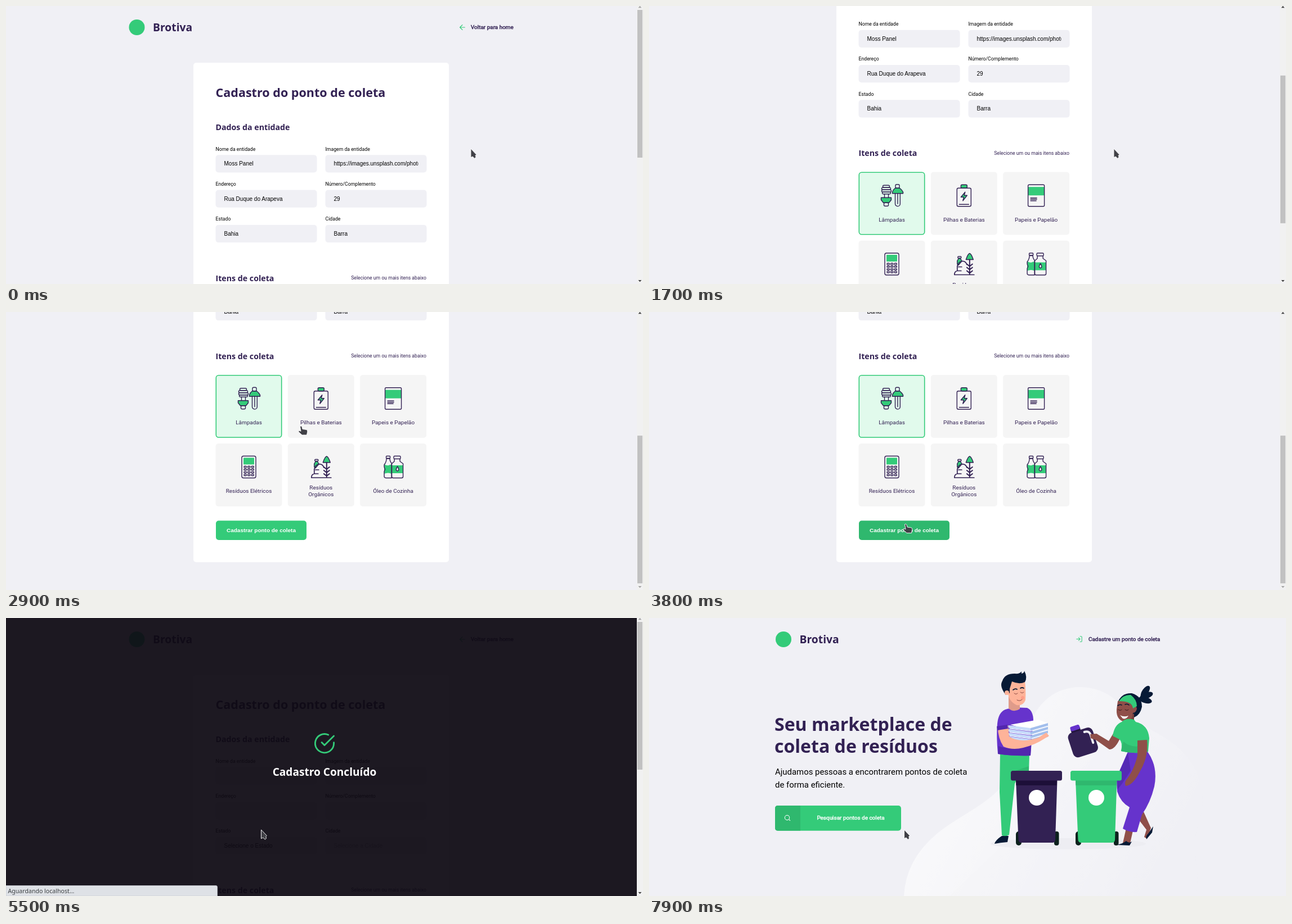
Animation of 1132 by 495 pixels, one loop 8 s. Source, as an HTML page:

```html
<!DOCTYPE html>
<html lang="pt-BR">
<head>
<meta charset="utf-8">
<title>Cadastro de ponto de coleta</title>
<style>
  html, body { margin: 0; width: 100%; height: 100%; overflow: hidden; background: #f0f0f5; }
  svg.stage { display: block; width: 100vw; height: 100vh; }
  text { font: 8.7px Roboto, sans-serif; fill: #000; white-space: pre; }
  .title { font: 700 21.55px "Open Sans", sans-serif; fill: #322153; }
  .sub { font-size: 14.2px; }
  .brand { font-size: 19.3px; }
  .hero { font-size: 32.05px; }
  .done { font-size: 19.1px; fill: #fff; }
  .note { fill: #322153; }
  .item { font-size: 9.95px; fill: #322153; }
  .link { font-size: 9.95px; fill: #322153; stroke: #322153; stroke-width: .45px; }
  .light { fill: #fff; stroke: #fff; }
  .lead { font-size: 14.93px; }
  .value, .hint { font: 10px "Liberation Sans", Arial, sans-serif; }
  .hint { fill: #999; }
  .submit { font: 700 9.97px "Liberation Sans", Arial, sans-serif; fill: #fff; }
  .status { font: 10.6px "Noto Sans", sans-serif; fill: #3c4043; }
  .icon { fill: none; stroke: #322153; stroke-width: 1.4; stroke-linejoin: round; stroke-linecap: round; }
  .icon .g { fill: #34cb79; }
  .icon .n { stroke: none; }
  .line { fill: none; stroke: #34cb79; stroke-width: 2; stroke-linecap: round; stroke-linejoin: round; }
</style>
</head>
<body>
<script>
const GREEN = '#34cb79', DARK_GREEN = '#2fb86e', PLUM = '#322153', VIOLET = '#6633cc';
const NAVY = '#071a36', PEACH = '#feb399', BROWN = '#8f4f49';

const text = (x, y, str, cls = '', anchor = 'start') =>
  `<text x="${x}" y="${y}" class="${cls}" text-anchor="${anchor}">${str}</text>`;
const rect = (x, y, w, h, r = 0, fill = '', extra = '') =>
  `<rect x="${x}" y="${y}" width="${w}" height="${h}" rx="${r}" ${fill && `fill="${fill}"`} ${extra}/>`;
const path = (d, fill = '', extra = '') => `<path d="${d}" ${fill && `fill="${fill}"`} ${extra}/>`;
const stroke = (d, color, width) => path(d, 'none', `stroke="${color}" stroke-width="${width}" stroke-linecap="round"`);
const circle = (x, y, r, fill) => `<circle cx="${x}" cy="${y}" r="${r}" fill="${fill}"/>`;
const feather = (x, y, scale, d, extra = '') =>
  `<path class="line" transform="translate(${x} ${y}) scale(${scale}) translate(-12 -12)" d="${d}" ${extra}/>`;
const green = 'class="g"';

const calcKeys = [0, 1, 2, 3].flatMap(row => [-8.5, -2, 4.5].map(x => rect(x, -1.5 + row * 4.8, 4.4, 2.6, 1.2)));

const items = [
  ['Lâmpadas',
    rect(-16, -18, 12, 4, 2) + rect(-18, -14, 16, 4, 2) + rect(-18, -10, 17, 4, 2) + rect(-17, -6, 15, 3.5, 1.7) +
    path('M-13-2.5V4M-6-2.5V4') + path('M-19 4H-1V8L-5 13H-15L-19 8Z', '', green) + rect(-14, 13, 8, 6, 2) +
    path('M1-3.5V-6Q2-10 6-13H14Q18-10 20-6V-3.5Z', '', green) + rect(6.5, -19.5, 7, 6.5, 2) +
    path('M6-3.5V15a4.4 4.4 0 0 0 8.8 0V-3.5M10.4-3.5V15')],
  ['Pilhas e Baterias',
    rect(-5.5, -19, 11, 6, 2, '', green) + rect(-12.5, -13, 25, 32.5, 2.5) +
    path('M2-6L-5.5 3H-.5L-2 9.5L5.5 0H.5Z', '', green) + path('M-8.5 16H8.5')],
  ['Papeis e Papelão',
    rect(-14, -15, 28, 15, 0, '', 'class="g n"') + rect(-14.5, -19, 29, 38.5, 2) + path('M-10 4.5H1M-10 7H1M-10 9.5H0')],
  ['Resíduos Elétricos',
    rect(-12.5, -19.5, 25, 39, 3) + rect(-9.5, -16.5, 19, 12, 1, '', 'class="g n"') + calcKeys.join('')],
  ['Resíduos|Orgânicos',
    path('M3.5-8Q7-18.5 10-19Q13-18.5 16.5-8Z', '', green) + rect(-11, -13.5, 6, 3, 1) +
    path('M-12 0V-6L-9.5-10H-6.5L-4-6V-5L-10 2Z', '', green) +
    path('M-17 19Q-17 13-12 12V4Q-10-4-4-5Q3-6 5 1M-17 19H18M-12 12H-5M-10 5H-4', '', 'stroke-width="1.7"') +
    path('M10-8V18M5 0L10 4L15 0M5 6L10 10L15 6M5 12L10 16L15 12', '', 'stroke-width="2"')],
  ['Óleo de Cozinha',
    path('M-16-5Q-10-1-6-4L-3-4V12Q-9 9-16 12Z', '', 'class="g n"') + rect(-12.5, -19.5, 7, 4, 1) +
    path('M-12-15Q-12-9-16-4V0L-14.5 4-16 8V17Q-16 19-13 19.5H-3V-7Q-6-10-6-15Z') +
    rect(-2, -3, 19, 14, 0, '', 'class="g n"') + rect(1, -19.5, 12, 5, 1.5) +
    path('M2-14V-10L-2.5-6V17Q-2.5 19.5 0 19.5H15Q17.5 19.5 17.5 17V-6L12-10V-14') +
    path('M7.5-1Q3 6 7.5 7Q12 6 7.5-1Z', '#f5f5f5')],
];

const itemCard = ([label, art], i) => {
  const x = 372.5 + i % 3 * 128.3, y = 518 + (i > 2) * 122.3, mid = x + 59;
  const box = i ? rect(x, y, 118, 112, 5, '#f5f5f5')
    : rect(x + .8, y + .8, 116.4, 110.4, 4.5, '#e1faec', `stroke="${GREEN}" stroke-width="1.6"`);
  const lines = label.split('|');
  const base = y + (lines.length > 1 ? 82 : 88);
  return box + `<g class="icon" transform="translate(${mid} ${y + 41.7})">${art}</g>` +
    lines.map((line, n) => text(mid, base + n * 11.5, line, 'item', 'middle')).join('');
};

const fields = [
  ['Nome da entidade', 'Moss Panel', ''],
  ['Imagem da entidade', 'https://images.unsplash.com/photo-1', ''],
  ['Endereço', 'Rua Duque do Arapeva', ''],
  ['Número/Complemento', '29', ''],
  ['Estado', 'Bahia', 'Selecione o Estado'],
  ['Cidade', 'Barra', 'Selecione a Cidade'],
].map(([label, value, empty], i) => ({
  label, value, empty, x: i % 2 ? 567.5 : 372.5, y: 265.2 + (i >> 1) * 62.3,
}));
const entry = (f, str, cls) =>
  `<svg x="${f.x + 15}" y="${f.y}" width="150" height="31">${text(0, 19, str, cls)}</svg>`;

const brand = x => circle(x + 15, 38, 14, GREEN) + text(x + 43.5, 45, 'Brotiva', 'title brand');

const form = brand(217.5) +
  feather(811, 38, .62, 'M19 12H5M12 19L5 12L12 5') + text(826, 41, 'Voltar para home', 'link') +
  rect(333, 101, 454, 750.5, 5, '#fff') +
  text(372.5, 161.5, 'Cadastro do ponto de coleta', 'title') +
  text(372.5, 220.5, 'Dados da entidade', 'title sub') +
  fields.map(f => text(f.x, f.y - 7.7, f.label) + rect(f.x, f.y, 180, 31.3, 5, '#f0f0f5')).join('') +
  `<g id="filled">${fields.map(f => entry(f, f.value, 'value')).join('')}</g>` +
  `<g id="blank">${fields.map((f, i) => entry(f, f.empty, i === 5 ? 'hint' : 'value')).join('')}</g>` +
  text(372.5, 489.5, 'Itens de coleta', 'title sub') +
  text(747, 487.3, 'Selecione um ou mais itens abaixo', 'note', 'end') +
  items.map(itemCard).join('') +
  rect(373, 777.5, 161, 34.5, 5, GREEN, 'id="button"') +
  text(453.5, 798, 'Cadastrar ponto de coleta', 'submit', 'middle');

const bin = (x, lid, shade) =>
  rect(x + 9, 380, 10, 25, 5, '#0c211d') + rect(x + 77, 380, 8.5, 25, 4, '#0c211d') +
  path(`M${x + 9} 288H${x + 82.5}L${x + 79} 395Q${x + 78.5} 400 ${x + 74} 400H${x + 19}Q${x + 14} 400 ${x + 13.5} 395Z`, lid) +
  path(`M${x + 9} 289H${x + 82}L${x + 81.6} 298H${x + 9.5}Z`, shade) +
  rect(x, 272, 91, 17.5, 3.5, lid) + circle(x + 46, 320, 14, '#fff');

const sheets = [0, 1, 2, 3].map(i => {
  const y = 191 + i * 6.7;
  return path(`M639 ${y}L678 ${y + 5}V${y + 10}L641 ${y + 5.5}Q637 ${y + 3} 639 ${y}Z`, '#c7dbfa') +
    path(`M678 ${y + 5}L709 ${y - 4}V${y + 1}L678 ${y + 10}Z`, '#a3bfec') +
    stroke(`M641 ${y + 5.8}L678 ${y + 10.4}L708 ${y + 1.5}`, '#f2f7ff', 1.3);
}).join('');

const man =
  path('M614 402Q616 395 627 388H639L637 399Q624 400 614 402Z', NAVY) +
  path('M624 242L623 310 627 387Q634 390 640 386L650 295 660 274 675 274 676 242Z', GREEN) +
  path('M645 274L675 264V276H643Z', DARK_GREEN) +
  path('M633 163Q648 158 672 160Q683 165 683 183L678 245Q648 246 620 242Q617 210 619 188Q621 168 633 163Z', VIOLET) +
  path('M621 228Q648 238 679 225L678 245Q648 246 620 242Z', '#5226ae') +
  path('M639 136L659 150V162Q648 169 639 161Z', '#df9b8a') +
  path('M638 120L644 111 668 112Q670 130 669 146Q665 157 653 155Q639 148 638 133Z', PEACH) +
  path('M634 137Q622 121 628 112Q632 99 650 99Q659 100 662 95L662 99Q667 98 667 94Q673 106 668 114Q658 119 645 113L641 126V134L636 132Z', NAVY) +
  circle(636, 133, 4, PEACH) + circle(664, 142, 3, '#ff9d88') +
  stroke('M649 134q3 3 6 0M660 132q3 3 6 0M654 146q5 3 9-1', '#7b3b38', .9) +
  stroke('M647 128q4-3 7-1M660 125q3-2 6 0', NAVY, 1.8) +
  path('M642 190L692 181 710 188 678 200Z', '#fff') + sheets +
  path('M620 195L638 191 640 211Q660 224 692 213L706 204 711 210 704 214Q686 226 665 231Q646 236 630 229Q620 214 620 195Z', PEACH) +
  path('M618 193L637 190 638 197 619 200Z', '#5226ae');

const jug = `<g transform="rotate(-18 770 221)">${rect(748, 199, 46, 46, 9, PLUM)}${rect(757, 193, 17, 7, 2, '#24153f')}
  ${rect(757, 189, 17, 8, 2.5, VIOLET)}${path('M779 205Q788 205 788 213V228', 'none', 'stroke="#f0f0f5" stroke-width="4" stroke-linecap="round"')}</g>`;

const woman =
  [[882, 131, -55], [884, 138, -20], [882, 146, 15]].map(([x, y, a]) =>
    `<ellipse cx="${x}" cy="${y}" rx="12" ry="5.5" fill="${NAVY}" transform="rotate(${a} ${x} ${y})"/>`).join('') +
  path('M833 150Q840 133 858 134Q876 139 876 158Q873 173 862 177Z', NAVY) +
  path('M844 180L862 170V190Q852 195 842 188Z', '#76403d') +
  path('M833 148Q848 143 860 157Q867 156 867 162Q865 169 860 169Q858 186 846 185Q830 182 831 163Z', BROWN) +
  path('M835 148Q843 136 856 137Q867 145 867 157L860 161Q859 148 835 148Z', GREEN) +
  stroke('M834 163q4 3 6 0M846 163q4 3 6 0', '#2c1518', .9) + stroke('M833 156q4-3 7-1M846 154q4-2 7 1', NAVY, 1.6) +
  path('M837 173Q844 177 852 174Q848 181 842 179Z', '#fff') +
  path('M879 345L892 374 885 393 880 390 884 377 868 356Z', BROWN) +
  path('M896 371L894 382 884 394Q882 388 887 384Z', NAVY) +
  path('M848 374H861L855 401H842Z', BROWN) + path('M831 404Q842 402 848 397Q853 402 858 398L854 405Z', NAVY) +
  path('M851 238H886Q905 265 898 300Q891 329 876 350L867 381Q853 382 842 375L854 337Q838 328 832 309L831 284Z', VIOLET) +
  path('M831 284L851 240 856 272 840 296 832 306Z', '#552ab5') +
  path('M826 204L838 212Q829 234 818 234L794 217 785 214 786 206 797 207 817 219Z', BROWN) +
  path('M840 185Q848 177 862 181L865 185Q887 190 889 214L887 238Q862 243 839 237Q842 221 836 216L824 210Q827 190 840 185Z', GREEN) +
  path('M843 220Q860 235 884 224L887 238Q862 243 839 237Z', DARK_GREEN) +
  path('M868 218L885 217Q888 248 872 274Q860 298 847 299Q844 292 850 286Q862 270 868 245Z', BROWN);

const home = rect(0, 0, 1132, 495, 0, '#f0f0f5') +
  path('M453 495Q456 430 513 383C570 338 632 324 657 245C674 178 700 123 768 123C835 126 843 174 903 205C970 241 1000 300 975 372C960 420 985 455 970 495Z', 'url(#glow)') +
  path('M534 495L860 180 903 205C970 241 1000 300 975 372C960 420 985 455 970 495Z', '#f0f0f5', 'opacity=".2"') +
  brand(224) +
  feather(764.5, 37.5, .52, 'M15 3h4a2 2 0 0 1 2 2v14a2 2 0 0 1-2 2h-4M10 17L15 12L10 7M15 12H3') +
  text(781, 40.5, 'Cadastre um ponto de coleta', 'link') +
  text(223, 201, 'Seu marketplace de', 'title hero') + text(223, 240, 'coleta de resíduos', 'title hero') +
  text(224, 279, 'Ajudamos pessoas a encontrarem pontos de coleta', 'lead') + text(224, 302, 'de forma eficiente.', 'lead') +
  rect(224, 334, 224, 44.7, 5, GREEN) + path('M229 334H269V378.7H229Q224 378.7 224 373.7V339Q224 334 229 334Z', DARK_GREEN) +
  feather(246, 356, .52, 'M19 11a8 8 0 1 1-16 0a8 8 0 1 1 16 0M21 21L16.7 16.7', 'style="stroke:#fff"') +
  text(358.5, 359.2, 'Pesquisar pontos de coleta', 'link light', 'middle') +
  '<ellipse cx="745" cy="402" rx="138" ry="10" fill="#ededf2"/>' +
  man + woman + bin(643, PLUM, '#1d0f38') + bin(749, GREEN, DARK_GREEN) + jug +
  path('M784 207L796 206 800 211 793 217 785 214Z', BROWN);

document.body.innerHTML = `<svg class="stage" viewBox="0 0 1132 495">
  <defs><linearGradient id="glow" gradientUnits="userSpaceOnUse" x1="560" y1="230" x2="930" y2="430">
    <stop stop-color="#fff" stop-opacity=".6"/><stop offset="1" stop-color="#fff" stop-opacity="0"/></linearGradient></defs>
  <g id="page">${form}</g>
  <g id="overlay">${rect(0, 0, 1132, 495, 0, '#0e0a14ef')}
    ${feather(566, 223.2, 1.66, 'M22 11.08V12a10 10 0 1 1-5.93-9.14M22 4L12 14.01L9 11.01', 'style="stroke-width:1.7"')}
    ${text(566, 281, 'Cadastro Concluído', 'title done', 'middle')}</g>
  <g id="scrollbar">${rect(1121, 0, 11, 495, 0, '#f1f1f1')}${rect(1122, 7, 9, 263, 0, '#c1c1c1', 'id="thumb"')}
    ${path('M1123.5 3.2L1126.5 0L1129.5 3.2Z', '', 'id="up"')}${path('M1123.5 488L1126.5 491.2L1129.5 488Z', '', 'id="down"')}</g>
  <g id="status">${path('M0 476.5H373Q375.5 476.5 375.5 479V495H0Z', '#dee1e6', 'stroke="#c4c8ce" stroke-width=".8"')}
    ${text(3.5, 490, 'Aguardando localhost...', 'status')}</g>
  <g id="home">${home}</g>
  <g id="cursor" fill="#414147" stroke="#fff" stroke-width=".9" stroke-linejoin="round">
    ${path('M.5 0V15.8L3.8 14L7.2 17.4L9.8 15L8.6 12.4L10.4 10.6Z', '', 'id="arrow"')}
    ${path('M3.5 1.5Q6 0 7 2.5L8 6.5L15 7.5Q17 8 16.8 11L15.5 17H7L1 11.5Q0 9 3 9.3L5 10.5Z', '', 'id="hand"')}</g>
</svg>`;

const el = Object.fromEntries([...document.querySelectorAll('[id]')].map(node => [node.id, node]));
const show = (node, on) => node.style.display = on ? '' : 'none';
const at = (steps, t) => steps.findLast(step => step[0] <= t);

// [start ms, scroll offset]
const scrolls = [[0, 0], [1300, 12], [1400, 55], [1500, 108], [1600, 165], [1700, 222.5], [1800, 325], [1900, 406], [5500, 0]];
// [start ms, x, y, is hand]
const moves = [[0, 825.5, 254], [2400, 797, 230], [2500, 759.5, 198], [2900, 519, 202, 1], [3100, 512, 206, 1],
  [3200, 505, 210, 1], [3400, 452.5, 360], [3600, 451, 376.5, 1], [4200, 453, 377]];

function render(t) {
  const scroll = at(scrolls, t)[1];
  const [, x, y, hand] = at(moves, t);
  const sent = t >= 5500, focused = t >= 4200;
  el.page.setAttribute('transform', `translate(0 ${-scroll})`);
  el.thumb.setAttribute('y', 7 + scroll * .525);
  el.up.setAttribute('fill', scroll > 0 ? '#404040' : '#a3a3a3');
  el.down.setAttribute('fill', scroll < 406 ? '#404040' : '#a3a3a3');
  el.button.setAttribute('fill', t >= 3800 ? DARK_GREEN : GREEN);
  el.button.setAttribute('stroke', focused ? '#101010' : 'none');
  el.button.setAttribute('stroke-width', 1.6);
  el.button.setAttribute('rx', focused ? 3 : 5);
  show(el.filled, !sent);
  show(el.blank, sent);
  show(el.overlay, sent);
  show(el.home, t >= 7900);
  show(el.status, t >= 4500 && t < 6200);
  el.status.setAttribute('opacity', t >= 5800 ? .5 : 1);
  el.cursor.setAttribute('transform', `translate(${x} ${y})`);
  show(el.arrow, !hand);
  show(el.hand, hand);
}

const start = performance.now();
function tick() {
  render((performance.now() - start) % 8000);
  requestAnimationFrame(tick);
}
tick();
</script>
</body>
</html>
```
